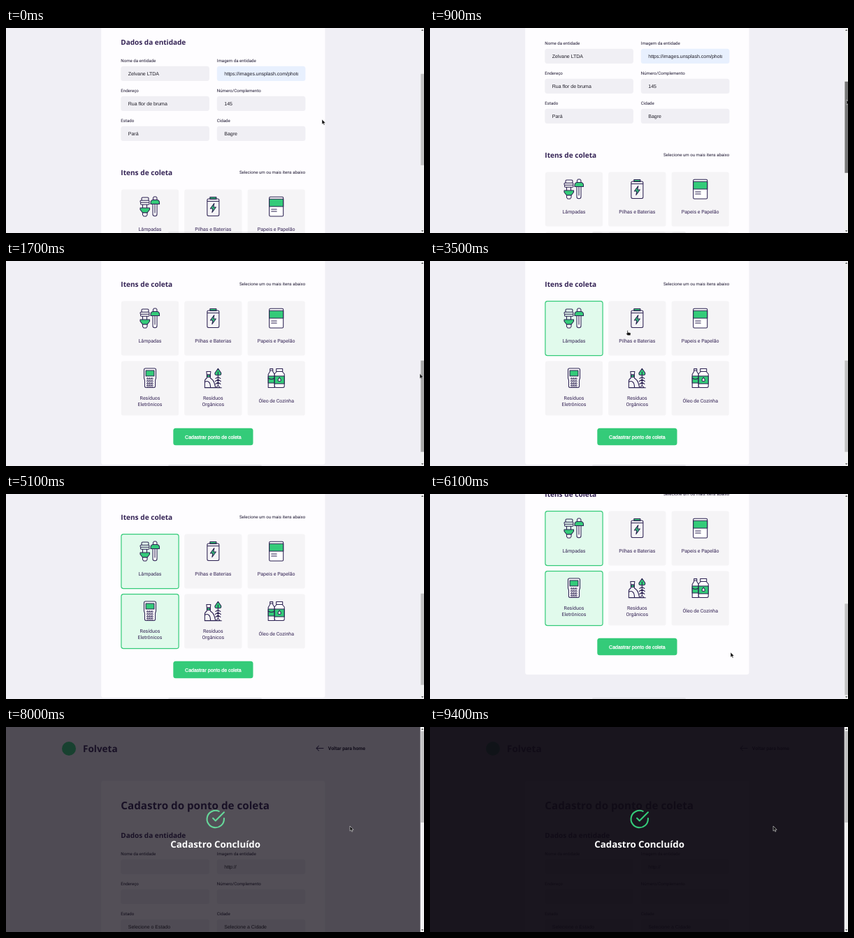
Recreate the animation shown at these times as an HTML page. Size 598 by 294 pixels, loop 9.7 s.

```html
<!DOCTYPE html>
<html lang="pt">
<head>
<meta charset="utf-8">
<title>Cadastro do ponto de coleta</title>
<style>
html, body { margin: 0; width: 100%; height: 100%; overflow: hidden; background: #f0eff5; }
svg { display: block; width: 598px; height: 294px; text-rendering: geometricPrecision; }
.head { font-family: "Open Sans", sans-serif; font-weight: 700; fill: #322153; }
.label { font: 6.14px Roboto, sans-serif; fill: #1c1630; }
.field { font: 7px "Liberation Sans", Arial, sans-serif; fill: #1c1a24; }
.item { font: 7px Roboto, sans-serif; fill: #322153; text-anchor: middle; }
.ink { fill: none; stroke: #2b2051; stroke-width: 1.05; stroke-linejoin: round; stroke-linecap: round; }
.ink .g { fill: #34cb79; }
.ink .w { fill: #fff; }
.ink .s { fill: #2b2051; stroke: none; }
</style>
</head>
<body>
<svg id="stage" viewBox="0 0 598 294"></svg>
<script>
const LOOP = 9700, STEP = 100, RESET = 7900;
const $ = id => document.getElementById(id);
const rect = (x, y, w, h, fill, r = 0, more = '') =>
  `<rect x="${x}" y="${y}" width="${w}" height="${h}" rx="${r}" fill="${fill}" ${more}/>`;
const text = (x, y, cls, str, more = '') => `<text x="${x}" y="${y}" class="${cls}" ${more}>${str}</text>`;
const head = (x, y, size, str, more = '') => text(x, y, 'head', str, `font-size="${size}" ${more}`);
const path = (d, cls = '') => `<path class="${cls}" d="${d}"/>`;

// Icons: x = 0 is the middle of the card, y = 0 its top edge
const icons = [
  path('M-12 13.5q0-1.5 1.500-1.500h7q1.500 0 1.500 1.500v1.800q0 1-1 1h-8q-1 0-1-1zM-13 16.300h11q1 0 1 1.500t-1 1.500h-11q-1 0-1-1.500t1-1.500zM-12.500 19.300h10.500q1 0 1 1.500t-1 1.500h-10.500q-1 0-1-1.500t1-1.500zM-10.500 22.500v4.500M-4.500 22.500v4.500') +
  path('M-14 27h13.500v2.500l-3.500 4.500h-6.500l-3.500-4.500z', 'g') + path('M-10.500 34h6.500v3l-1.500 2h-3.500l-1.500-2z', 'w') +
  path('M4 21v15q0 2.800 3 2.800t3-2.800v-15M7 22v12', 'w') +
  path('M1 21.500v-2q0-4 4-4h4.500q4 0 4 4v2z', 'g') + path('M4.500 15.500v-3l1.200-1.500h3l1.200 1.500v3z', 'w'),
  path('M-4.500 14.500v-3h9v3z', 'g') +
  path('M-6.500 14h13q2 0 2 2v20.500q0 2-2 2h-13q-2 0-2-2v-20.500q0-2 2-2zM-8.500 17.500h17') +
  path('M1.500 20.500l-5.500 7.500h3.500l-1 5.500 5.500-7.500h-3.500z', 'g'),
  path('M-8.500 11.300h17q1.500 0 1.500 1.500v24.700q0 1.500-1.500 1.500h-17q-1.500 0-1.500-1.500v-24.700q0-1.500 1.500-1.500z', 'w') +
  path('M-10 14.300h20v10.700h-20z', 'g') + path('M-7 29h7.500M-7 32h7.500'),
  path('M-6.500 11h13q2 0 2 2v12l-1 3v8.500q0 2-2 2h-11q-2 0-2-2v-8.500l-1-3v-12q0-2 2-2z', 'w') +
  path('M-6 14h12v8h-12z', 'g') +
  [25, 28.5, 32, 35.3].map(y => [-4.5, -1.4, 1.7].map(x => rect(x, y, 2.6, 1.7, 'none', .6, 'stroke-width=".8"')).join('')).join(''),
  path('M-12 38.500v-9q0-3 3-4.500v-5h5v5q4 2 5.500 6.500l2 7zM-9 20l-.5-4.500h6l-.5 4.500M-11.800 30.500q3-2 5.500 0t2.500 8') +
  path('M-8.500 20.500h4v3h-4z', 'g') +
  path('M7 11.200l4.200 6q1 3.500-2 3.500h-4.400q-3 0-2-3.500z', 'g') +
  path('M7 16v20M3.500 25.500l3.500-2 3.500 2M3 29.500l4-2.500 4 2.500M3.500 33.500l3.500-2.500 3.500 2.500M4 38.500l3-3 3 3zM-12 38.700h24'),
  path('M-9 11.500h4v4l2.500 4v19h-9v-19l2.500-4z', 'w') + path('M-11.500 22h9v10h-9z', 'g') + path('M-9 14h4M-11.500 25q4.500 3 9 0') +
  path('M0 11.500h9v4h-9zM.5 15.500h8l3 3.500v17.500q0 2-2 2h-10q-2 0-2-2v-17.500z', 'w') +
  path('M-2.500 22h14v11h-14z', 'g') + path('M4.500 24l2 3q.6 2.500-2 2.500t-2-2.500z', 'w')
];
const names = [['Lâmpadas'], ['Pilhas e Baterias'], ['Papeis e Papelão'],
  ['Resíduos', 'Eletrônicos'], ['Resíduos', 'Orgânicos'], ['Óleo de Cozinha']];

const item = (lines, i) => {
  const x = 164.3 + (i % 3) * 90.35, y = i < 3 ? 366 : 452;
  const first = lines.length > 1 ? 56.4 : 60.4;
  return `<g transform="translate(${x} ${y})">` +
    rect(.6, .6, 82.2, 78, '#f5f4f6', 3.2, `id="item${i}" stroke-width="1.2"`) +
    `<g class="ink" transform="translate(41.7 0)">${icons[i]}</g>` +
    lines.map((s, n) => text(41.7, first + n * 8.2, 'item', s)).join('') + '</g>';
};

const fields = [
  ['Nome da entidade', 'Zelvane LTDA', ''],
  ['Imagem da entidade', 'https://images.unsplash.com/photo-1', 'http://'],
  ['Endereço', 'Rua flor de bruma', ''],
  ['Número/Complemento', '145', ''],
  ['Estado', 'Pará', 'Selecione o Estado'],
  ['Cidade', 'Bagre', 'Selecione a Cidade']
];
const field = ([label, value], i) => {
  const x = i % 2 ? 301.8 : 164.3, y = (i >> 1) * 43;
  return text(x, 184.4 + y, 'label', label) +
    rect(x, 189.8 + y, 126.6, 21.2, '#f0eff4', 3.5, `id="box${i}"`) +
    `<svg x="${x + 10.5}" y="${190 + y}" width="105.8" height="21">` +
    text(0, 12.7, 'field', value, `id="val${i}"`) + '</svg>';
};

$('stage').innerHTML = rect(0, 0, 598, 294, '#f0eff5') +
  '<g id="page">' +
  '<circle cx="90" cy="31" r="10" fill="#34cb79"/>' + head(110, 35.6, 13.5, 'Folveta') +
  path('M454 30.500h-10M447.500 27l-3.500 3.500 3.500 3.500', 'ink') +
  text(514, 33, 'label', 'Voltar para home', 'text-anchor="end" style="font-size:6.9px;font-weight:700"') +
  rect(136.2, 77, 320.2, 524, '#fefdff', 3.5) +
  head(164.3, 118, 15.2, 'Cadastro do ponto de coleta') +
  head(164.3, 158.8, 10, 'Dados da entidade') + fields.map(field).join('') +
  head(164.3, 345.8, 10.1, 'Itens de coleta') +
  text(428.3, 344.4, 'label', 'Selecione um ou mais itens abaixo', 'text-anchor="end"') +
  names.map(item).join('') +
  rect(239.3, 548.8, 114.2, 24.5, '#34cb79', 3.5, 'id="button"') +
  text(296.4, 563.5, 'field', 'Cadastrar ponto de coleta', 'text-anchor="middle" style="fill:#fff;stroke:#fff;stroke-width:.3"') +
  '</g>' +
  rect(232, 292, 134, 4, '#000', 2, 'id="strip" opacity=".06"') +
  '<g id="status">' + rect(-3, 285.8, 202, 12, '#080808', 2) +
  text(2, 291.9, '', 'Aguardando localhost...', 'fill="#f4f4f4" font-family="Open Sans, sans-serif" font-weight="600" font-size="5.3"') + '</g>' +
  '<g id="modal">' + rect(0, 0, 598, 294, '#0e0a14', 0, 'opacity=".95"') +
  '<g transform="translate(285.100 117.400) scale(1.220)" fill="none" stroke="#34cb79" stroke-width="1.700" stroke-linecap="round" stroke-linejoin="round">' +
  path('M22 11.080V12a10 10 0 1 1-5.930-9.140M22 4L12 14.010l-3-3') + '</g>' +
  head(299.6, 173, 13.3, 'Cadastro Concluído', 'text-anchor="middle" style="fill:#fff"') + '</g>' +
  rect(592.7, 0, 5.3, 294, '#f1f1f1') + rect(593.4, 6, 4.6, 131, '#c1c1c1', 0, 'id="thumb"') +
  '<path d="M594 4l1.700-2 1.700 2zM594 290.200l1.700 2 1.700-2z" fill="#505050"/>' +
  '<g id="cursor" fill="#111" stroke="#fff" stroke-width=".5" stroke-linejoin="round">' +
  '<path id="arrow" d="M0 0v7.200l1.700-1.500 1.100 2.500 1.200-.5-1.100-2.400h2.300z"/>' +
  '<path id="hand" d="M0 .3q.6-.6 1.200 0v2.500l3.300.7q.8.300.7 1.200l-.6 2.500h-3.800l-2.200-2.500q0-.8.800-.6l.6.500z"/></g>';

// Keys: time, then one or two values
const scrollKeys = [[0, 135], [600, 135], [900, 160], [1000, 178], [1500, 309], [5200, 309], [5700, 342]];
const mouseKeys = [
  [0, 452, 131], [500, 594, 92], [600, 596, 92], [900, 596, 103], [1000, 596, 111], [1500, 596, 169], [1700, 592, 161.5],
  [2000, 388, 130], [2200, 320, 2], [2500, 300, 246], [2800, 186, 108], [2900, 186, 108],
  [3100, 205, 104], [3300, 212, 103], [3500, 282, 99.5], [3700, 390, 108], [3900, 388, 205],
  [4000, 365, 245], [4200, 208, 186], [4600, 205, 188], [4800, 400, 200], [5000, 604, 215], [5100, 604, 215],
  [5200, 595, 215], [5700, 595, 229.6], [5900, 540, 232], [6300, 320, 222], [7000, 310, 220],
  [7300, 440, 165], [7500, 495, 143], [7700, 492, 142], [8300, 492, 142], [8600, 491, 142]
];
const at = (keys, t, n = 1) => {
  const i = keys.findIndex(k => k[0] > t);
  if (i < 0) return keys[keys.length - 1][n];
  const a = keys[i - 1], b = keys[i];
  return a[n] + (b[n] - a[n]) * (t - a[0]) / (b[0] - a[0]);
};
const within = (v, a, b) => v >= a && v < b;
const show = (id, on) => $(id).setAttribute('display', on ? 'inline' : 'none');

function draw(t) {
  const done = t >= RESET;
  const scroll = done ? 0 : at(scrollKeys, t);
  const x = at(mouseKeys, t), y = at(mouseKeys, t, 2), docY = y + scroll;
  $('page').setAttribute('transform', `translate(0 ${-scroll})`);

  const drag = within(t, 600, 1600) || within(t, 5200, 5800);
  const near = within(x, 591, 598);
  $('thumb').setAttribute('y', 6 + scroll * .4425);
  $('thumb').setAttribute('fill', drag ? '#787878' : near ? '#a8a8a8' : '#c1c1c1');

  fields.forEach((f, i) => { $('val' + i).textContent = f[done ? 2 : 1]; });
  $('box1').setAttribute('fill', done ? '#f0eff4' : '#e8f0fe');
  [[0, 3100], [3, 4600]].forEach(([i, from]) => {
    const on = within(t, from, RESET);
    $('item' + i).setAttribute('fill', on ? '#e1faec' : '#f5f4f6');
    $('item' + i).setAttribute('stroke', on ? '#34cb79' : 'none');
  });

  const onButton = within(x, 239, 354) && within(docY, 549, 573);
  const onItem = within(x, 164, 428) && within((x - 164.3) % 90.35, 0, 83.4) &&
    (within(docY, 366, 445) || within(docY, 452, 531));
  const waiting = within(t, 7000, RESET);
  $('button').setAttribute('fill', (onButton || waiting) && !done ? '#2fb86e' : '#34cb79');

  const hand = !done && (onItem || onButton);
  $('cursor').setAttribute('transform', `translate(${x} ${y})`);
  show('hand', hand);
  show('arrow', !hand);
  show('status', waiting);
  show('strip', !done);
  const fade = Math.min(1, Math.max(0, (t - RESET + STEP) / 400));
  $('modal').setAttribute('opacity', 1 - (1 - fade) ** 2);
}

const start = performance.now();
function tick() {
  const t = (performance.now() - start) % LOOP;
  draw(Math.floor(t / STEP) * STEP);
  requestAnimationFrame(tick);
}
tick();
</script>
</body>
</html>
```
